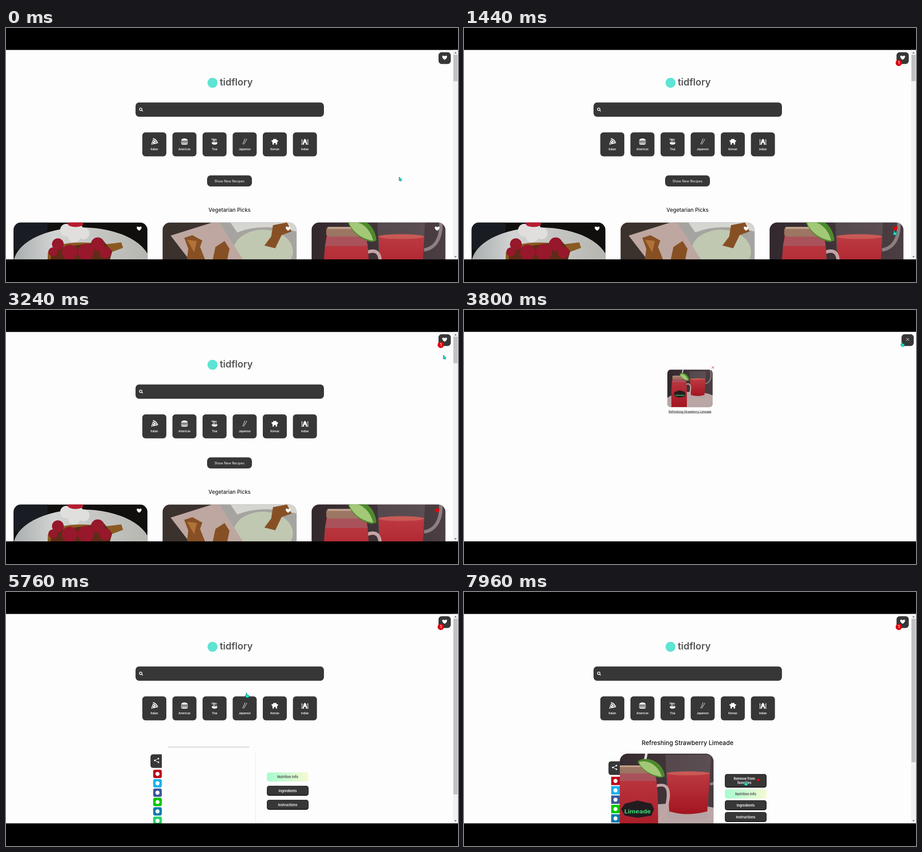
Write an HTML page that moves like this. It is 998 by 561 pixels and loops after 8000 ms.

```html
<!DOCTYPE html>
<html lang="en">
<head>
<meta charset="utf-8">
<title>Recipe finder</title>
<style>
  html, body { margin: 0; width: 100%; height: 100%; overflow: hidden; background: #000; }
  svg { display: block; width: 100vw; height: 100vh; font-family: Inter, sans-serif; }
  .mid { text-anchor: middle; }
  .dark { fill: #373737; }
  .line { fill: none; stroke: #fff; }
</style>
</head>
<body>
<svg viewBox="0 0 998 561">
  <defs>
    <path id="heart" d="M0 4.800C-9 -1.300 -4.800 -7.700 0 -3C4.800 -7.700 9 -1.300 0 4.800Z"/>
    <linearGradient id="mint"><stop stop-color="#a6fbd0"/><stop offset="1" stop-color="#f6f9d2"/></linearGradient>
    <linearGradient id="wall"><stop stop-color="#33282d"/><stop offset="1" stop-color="#4c3f43"/></linearGradient>
    <linearGradient id="juice" x2="0" y2="1"><stop stop-color="#bd3a42"/><stop offset="1" stop-color="#a31520"/></linearGradient>
    <linearGradient id="plate"><stop stop-color="#a9adae"/><stop offset=".3" stop-color="#d2d4d3"/><stop offset="1" stop-color="#b5b5af"/></linearGradient>
    <filter id="shadow" x="-10%" y="-30%" width="120%" height="170%">
      <feDropShadow dx="0" dy="1" stdDeviation="2.5" flood-opacity=".2"/>
    </filter>
    <clipPath id="view"><rect y="48.500" width="998" height="462.500"/></clipPath>
    <clipPath id="card"><rect width="296" height="140" rx="17"/></clipPath>
    <clipPath id="thumb"><rect x="449" y="131.500" width="100" height="83" rx="8"/></clipPath>
    <clipPath id="photo"><rect x="344" y="357" width="207" height="200" rx="17"/></clipPath>

    <g id="drinks">
      <rect width="100" height="83" fill="url(#wall)"/>
      <ellipse cx="55" cy="74" rx="62" ry="25" fill="#b9a6a5"/>
      <path d="M84 31C97 29 99 12 94 0" fill="none" stroke="#8b7f80" stroke-width="2.500"/>
      <path d="M49 4H85L82 63H51Z" fill="#a99d9e" opacity=".2"/>
      <path d="M50 21H84L82 56Q66 61 52 56Z" fill="url(#juice)"/>
      <ellipse cx="67" cy="21" rx="17" ry="1.800" fill="#c95a55"/>
      <path d="M41 33Q53 28 51 45T41 66" fill="none" stroke="#c5a4a5" stroke-width="2.500"/>
      <path d="M12 18H40Q44 30 43 83H9Q8 30 12 18Z" fill="url(#juice)"/>
      <path d="M12 20H40L42 28H10Z" fill="#a9525b"/>
      <rect x="11" y="14" width="30" height="7" rx="2" fill="#9d7563"/>
      <path d="M12 14.500H40" stroke="#c2a48d" stroke-width="1.500"/>
      <path d="M34.500 0L32 14" stroke="#ddd" stroke-width="2"/>
      <path d="M27 10C32 5 47 8 48.500 24L45 25C38 24 30 18 27 10Z" fill="#4d8a2c"/>
      <path d="M28 11C33 8 43 12 46 24C38 23 31 18 28 11Z" fill="#a3c878"/>
      <path d="M17 49L27 46L38 49L40 54L38 60L27 62L17 60L14 54Z" fill="#221c20"/>
      <text class="mid" x="27" y="58" font-size="5" font-weight="700" fill="#39d873">Limeade</text>
    </g>

    <g id="dessert">
      <rect width="296" height="140" fill="#110f0d"/>
      <rect width="75" height="60" fill="#191d23"/>
      <ellipse cx="151" cy="92" rx="151" ry="81" fill="url(#plate)"/>
      <path d="M76 66Q100 35 205 48L238 44L242 56L215 66L212 90H75Z" fill="#8b5a22"/>
      <path d="M84 58L200 42L218 64L212 85H82Z" fill="#5f2c17"/>
      <g fill="#97172b">
        <circle cx="98" cy="48" r="13"/><circle cx="124" cy="66" r="17"/><circle cx="160" cy="65" r="18"/>
        <circle cx="186" cy="48" r="15"/><circle cx="203" cy="66" r="13"/><circle cx="87" cy="65" r="10"/>
      </g>
      <g fill="#e0dfdd">
        <circle cx="117" cy="17" r="14"/><circle cx="138" cy="17" r="16"/>
        <circle cx="155" cy="24" r="13"/><circle cx="134" cy="30" r="14"/>
      </g>
      <ellipse cx="137" cy="3" rx="17" ry="7" fill="#b51d31"/>
    </g>

    <g id="snack">
      <rect width="296" height="140" fill="#3b322e"/>
      <path d="M123 0H296V140H150Z" fill="#a5a4a0"/>
      <path d="M150 0H296V20Q220 0 165 22Z" fill="#d5d5d1"/>
      <ellipse cx="222" cy="64" rx="66" ry="48" fill="#c0c8b1"/>
      <path d="M18 29L123 -4L183 90H65Z" fill="#bda7a0"/>
      <g fill="#875024">
        <path d="M48 34L66 28L88 40L83 54L94 82H54L57 58Z"/>
        <path d="M117 54L137 41L148 58L143 82H111Z"/>
        <path d="M244 6L275 0L285 20L263 28L249 57L225 51L240 31Z"/>
      </g>
      <path d="M54 38L76 41L70 66Z" fill="#b07238"/>
    </g>
  </defs>

  <g clip-path="url(#view)">
    <rect y="48" width="998" height="463" fill="#fdfdfd"/>
    <g id="page"></g>
    <g id="home"></g>
    <g id="recipe"></g>
    <g id="scroll">
      <rect x="987" y="48" width="11" height="463" fill="#f1f1f1"/>
      <rect id="grip" x="988" y="59" width="9" fill="#c1c1c1"/>
      <path d="M990 56L992.500 53L995 56ZM990 504L992.500 507L995 504Z" fill="#666"/>
    </g>
    <g id="toast">
      <rect x="10" y="58" width="163" height="34.500" rx="2" fill="#fff" filter="url(#shadow)"/>
      <circle cx="23" cy="75.500" r="5.500" fill="#1fc92d"/>
      <path class="line" d="M20.500 75.500L22.300 77.500L25.700 73.500" stroke-width="1.400"/>
      <text x="33" y="78.600" font-size="8.600" fill="#777">Added to favorites!</text>
      <path d="M162 64.500L167 69.500M167 64.500L162 69.500" stroke="#777"/>
    </g>
    <g id="favorites">
      <rect y="48" width="998" height="463" fill="#fdfdfd"/>
      <rect class="dark" x="966" y="53.500" width="27" height="26" rx="7"/>
      <path class="line" d="M976.500 62L982.500 68M982.500 62L976.500 68"/>
      <path d="M547 124.500L552 129.500M552 124.500L547 129.500" stroke="#e2132a"/>
      <g clip-path="url(#thumb)"><use href="#drinks" x="449" y="131.500"/></g>
      <text class="mid" x="499" y="226.500" font-size="6.250" font-weight="500" fill="#222" text-decoration="underline">Refreshing Strawberry Limeade</text>
    </g>
  </g>
  <g id="cursor" fill="#18e2c5" stroke="#17544d" stroke-width=".7" stroke-linejoin="round">
    <path id="arrow" d="M0 0V9L2.200 7.200L3.600 9.600L4.900 8.900L3.700 6.600L6.500 6.300Z"/>
    <path id="hand" d="M-1 .6Q0 -.8 1 .6V4L5 5Q6 5.500 5.500 7.500L4.500 10.500H-.5L-3 6.500Q-3 5 -1 6Z"/>
  </g>
</svg>
<script>
const $ = id => document.getElementById(id);
const show = (id, on) => $(id).setAttribute('visibility', on ? 'visible' : 'hidden');
const move = (id, x, y = 0) => $(id).setAttribute('transform', `translate(${x} ${y})`);

const box = (x, y, w, h, r, fill = '#373737') =>
  `<rect x="${x}" y="${y}" width="${w}" height="${h}" rx="${r}" fill="${fill}"/>`;
const label = (text, x, y, size, weight = 600, fill = '#fff') =>
  `<text class="mid" x="${x}" y="${y}" font-size="${size}" font-weight="${weight}" fill="${fill}">${text}</text>`;
const heart = (x, y, fill = '#fff', id = '') =>
  `<use id="${id}" href="#heart" x="${x}" y="${y}" fill="${fill}"/>`;

// Category icons, drawn around their own centre
const cuisines = {
  Italian: `<path fill="#fff" d="M-3-4L-7 7L6 4.500Q3-2-3-4Z"/><path class="line" stroke-width="2" d="M-3-6.500Q5-4 7.500 4"/>
    <g class="dark"><circle cx="-2" r="1.200"/><circle cx="2" cy="2.500" r="1.200"/><circle cx="-3.500" cy="4" r="1.200"/></g>`,
  American: `<path fill="#fff" d="M-7.500-1.500Q-6.500-6.500 0-6.500T7.500-1.500ZM-7.500 4H7.500Q7 7 4 7H-4Q-7 7-7.500 4Z"/>
    <path class="line" stroke-width="1.800" stroke-linecap="round" d="M-7 1.300H7"/>`,
  Thai: `<path fill="#fff" d="M-6.500 2H6.500Q6 6 3 7H-3Q-6 6-6.500 2Z"/>
    <path class="line" stroke-width=".8" d="M-7-6L5-4.500M-7-3.500L5-4M-3-5V2M-1-5V2M1 1Q-1-2 2-2T4 1"/>`,
  Japanese: `<path class="line" d="M-4.500 6.500L1-6.500M-2 6.500L5-5.500"/>`,
  Korean: `<path fill="#fff" d="M-3-6Q0-4 3-6L4-3Q6-2 7.500-3Q7 1 5 1.500V7H2V3.500H-2V7H-5V1.500Q-7 1-7.500-3Q-6-2-4-3Z"/>`,
  Indian: `<path fill="#fff" d="M-4.500 7V1.500H-3Q-5-2 0-6Q5-2 3 1.500H4.500V7H2V4Q0 1-2 4V7Z"/>
    <path class="line" stroke-width="1.200" d="M-6.500 7V-5M6.500 7V-5M-8 6.500H-4M4 6.500H8M-7.500-2H-5.500M5.500-2H7.500"/>`
};

$('page').innerHTML =
  box(955, 53.5, 27, 26, 7) + heart(968.5, 65.5) +
  `<g id="badge"><circle cx="960" cy="77" r="7" fill="#da0410"/>${label(1, 960, 80.3, 9, 500)}</g>` +
  `<circle cx="456" cy="121" r="11" fill="#5fe3d2"/>` +
  `<text x="472" y="127" font-size="20.800" font-weight="600" fill="#555">tidflory</text>` +
  box(286, 164.5, 416, 31.5, 8) +
  `<circle class="line" cx="297.500" cy="179.500" r="2.800" stroke-width="1.400"/><path class="line" stroke-width="1.600" d="M299.500 181.500L302 184"/>` +
  Object.entries(cuisines).map(([name, icon], i) => {
    const x = 327.5 + i * 66.5;
    return box(x - 26.5, 230.5, 53, 53, 7) + `<g transform="translate(${x} 250.500)">${icon}</g>` + label(name, x, 269.5, 5.65);
  }).join('');

$('home').innerHTML =
  box(444, 325.5, 99, 24.5, 8) + label('Show New Recipes', 493.5, 340.6, 7.3, 400) +
  label('Vegetarian Picks', 493.5, 406, 11.6, 500, '#222') +
  ['<use href="#dessert"/>', '<use href="#snack"/>', '<use href="#drinks" transform="translate(0 -31) scale(2.960)"/>']
    .map((art, i) => `<g transform="translate(${16.5 + i * 329} 429.500)"><g clip-path="url(#card)">${art}</g>${heart(277.5, 13.5, '#fff', 'like' + i)}</g>`)
    .join('');

const button = (text, y, h = 22) =>
  box(576, y, 92, h, 5, '#0c0c0c') + box(577, y + 0.5, 90, h - 2, 4) + label(text, 622, y + h / 2 + 2.5, 7.35);
const nutrition = y =>
  box(576, y, 92, 20, 5, 'url(#mint)') + label('Nutrition Info', 622, y + 12.6, 7.35, 600, '#444');

const sharing = (y, r) =>
  `<path class="dark" d="M344 ${y}H325Q319 ${y} 319 ${y + 6}V${y + 24}Q319 ${y + 30} 325 ${y + 30}H344Z"/>
   <g transform="translate(332.500 ${y + 13.5})"><path class="line" d="M4-4L-4 0L4 4"/>
   <g fill="#fff"><circle cx="4" cy="-4" r="1.800"/><circle cx="-4" r="1.800"/><circle cx="4" cy="4" r="1.800"/></g></g>` +
  ['#bd081c', '#1bb2ec', '#3b5998', '#00c800', '#0a7cae', '#25d366'].map((color, i) => {
    const top = y + 34 + i * 20.7;
    return box(325, top, 19, 18.5, r, color) + `<circle cx="334.500" cy="${top + 9.3}" r="4.500" fill="#fff"/>`;
  }).join('');

$('recipe').innerHTML =
  `<g id="loading"><path d="M358 342.500H537" stroke="#999" stroke-width=".8"/>
   <path d="M551 355V511" stroke="#d5d5cc" stroke-width=".8" stroke-dasharray="3 1"/>` +
  sharing(358.5, 4) + nutrition(398.5) + button('Ingredients', 428) + button('Instructions', 459) + `</g>
   <g id="loaded">` + label('Refreshing Strawberry Limeade', 493.5, 337.5, 13.4, 500, '#111') +
  `<g clip-path="url(#photo)"><use href="#drinks" transform="translate(307.600 350) scale(2.800 2.400)"/></g>` +
  sharing(374, 0) + button('', 402, 30) +
  label('Remove from', 619, 415.2, 7.35) + label('favorites', 619, 423.6, 7.35) +
  `<use href="#heart" transform="translate(650 415.500) scale(.7)" fill="#e00"/>` +
  nutrition(436) + button('Ingredients', 460) + button('Instructions', 486) + '</g>';

const LOOP = 8000, LIKE = 1400, TOAST_IN = 1480, TOAST_OUT = 2880, OPEN = 3440, RECIPE = 5760, LOADED = 6680;

// Time, x, y of the pointer tip
const path = [[0, 868, 329], [240, 868, 329], [900, 935, 420], [1200, 950, 447], [2160, 950, 447], [2560, 948, 379],
  [3000, 958, 190], [3320, 968, 70], [4160, 966, 70], [4980, 598, 146], [5280, 531, 223], [6600, 531, 223],
  [7080, 583, 317], [7420, 614, 400], [7800, 621, 417], [LOOP, 621, 417]];
const handTimes = [[1100, 2260], [3290, 4220], [5180, 6640], [7410, LOOP]];

const track = (keys, t) => {
  const i = keys.findIndex(k => k[0] > t), a = keys[i - 1], b = keys[i];
  const p = (t - a[0]) / (b[0] - a[0]);
  return a.slice(1).map((v, n) => v + (b[n + 1] - v) * p);
};
const toastPath = [[0, -300], [TOAST_IN, -300], [TOAST_IN + 420, 25], [TOAST_IN + 525, -10], [TOAST_IN + 630, 5],
  [TOAST_IN + 700, 0], [TOAST_OUT, 0], [TOAST_OUT + 140, 20], [TOAST_OUT + 300, -300], [LOOP, -300]];

function frame(now) {
  const t = now % LOOP;
  const open = t >= OPEN && t < RECIPE, loaded = t >= LOADED;
  show('home', t < RECIPE);
  show('loading', t >= RECIPE && !loaded);
  show('loaded', loaded);
  show('badge', t >= LIKE);
  $('like2').setAttribute('fill', t >= LIKE ? '#e80008' : '#fff');
  show('scroll', !open);
  $('grip').setAttribute('height', t < RECIPE ? 58.5 : loaded ? 317 : 388);
  show('favorites', open);
  $('favorites').setAttribute('opacity', Math.min(1, Math.max(0, (t - OPEN + 40) / 240)));
  move('toast', ...track(toastPath, t));
  const pointing = handTimes.some(([from, to]) => t >= from && t < to);
  show('hand', pointing);
  show('arrow', !pointing);
  move('cursor', ...track(path, t));
  requestAnimationFrame(frame);
}
requestAnimationFrame(frame);
</script>
</body>
</html>
```
